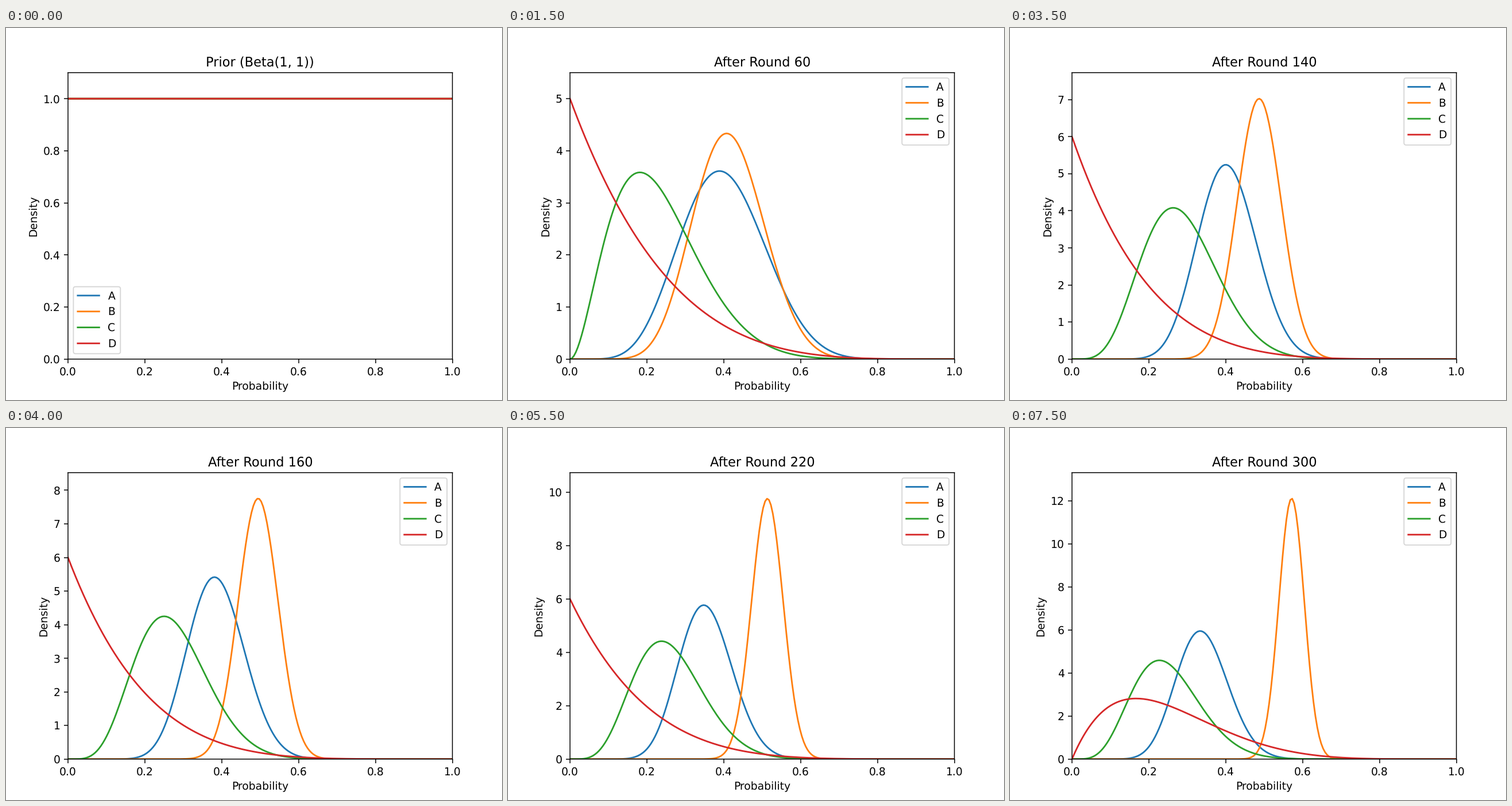
A matplotlib script that plays this animation: 864x648 px, repeating every 8000 ms.

```python
from math import comb

import matplotlib.pyplot as plt
import numpy as np
from matplotlib.animation import FuncAnimation

STEP = 20  # rounds between two snapshots
FRAMES = 16

# Smooth subpixel edges instead of grid-fitted lines and glyphs
plt.rcParams.update({"path.snap": False, "text.hinting": "none"})

x = np.linspace(0, 1, 200)
fig, ax = plt.subplots(figsize=(6.4, 4.8), dpi=135)


def count(rounds, points):
    """Whole-number count on the straight lines between {round: count} points."""
    return int(np.interp(rounds, list(points), list(points.values())) + 0.5)


def tallies(rounds):
    """(wins, trials) of each arm; B gets every round the others do not."""
    a = (count(rounds, {0: 0, 40: 5, 100: 11, 140: 16}),
         count(rounds, {0: 0, 40: 15, 100: 25, 140: 40, 200: 45, 300: 48}))
    c = (count(rounds, {0: 0, 40: 1, 100: 5}),
         count(rounds, {0: 0, 40: 8, 100: 18, 200: 21, 250: 22}))
    d = (count(rounds, {200: 0, 250: 1}),
         count(rounds, {0: 0, 40: 3, 100: 5, 200: 5, 250: 6}))
    b = (count(rounds, {0: 0, 40: 6, 100: 22, 140: 37, 200: 65, 250: 93, 300: 128}),
         rounds - a[1] - c[1] - d[1])
    return {"A": a, "B": b, "C": c, "D": d}


def posterior(wins, trials):
    """Density of Beta(1 + wins, 1 + losses)."""
    return (trials + 1) * comb(trials, wins) * x**wins * (1 - x)**(trials - wins)


def draw(i):
    rounds = i * STEP
    ax.clear()
    top = 0
    for name, (wins, trials) in tallies(rounds).items():
        y = posterior(wins, trials)
        ax.plot(x, y, label=name)
        top = max(top, y.max())
    ax.set_xlim(0, 1)
    ax.set_ylim(0, 1.1 * top)
    ax.set_title(f"After Round {rounds}" if rounds else "Prior (Beta(1, 1))")
    ax.set_xlabel("Probability")
    ax.set_ylabel("Density")
    ax.legend()
    return ax.lines


anim = FuncAnimation(fig, draw, frames=FRAMES, interval=500, repeat=True, repeat_delay=0,
                     init_func=lambda: draw(0))
plt.show()
```
